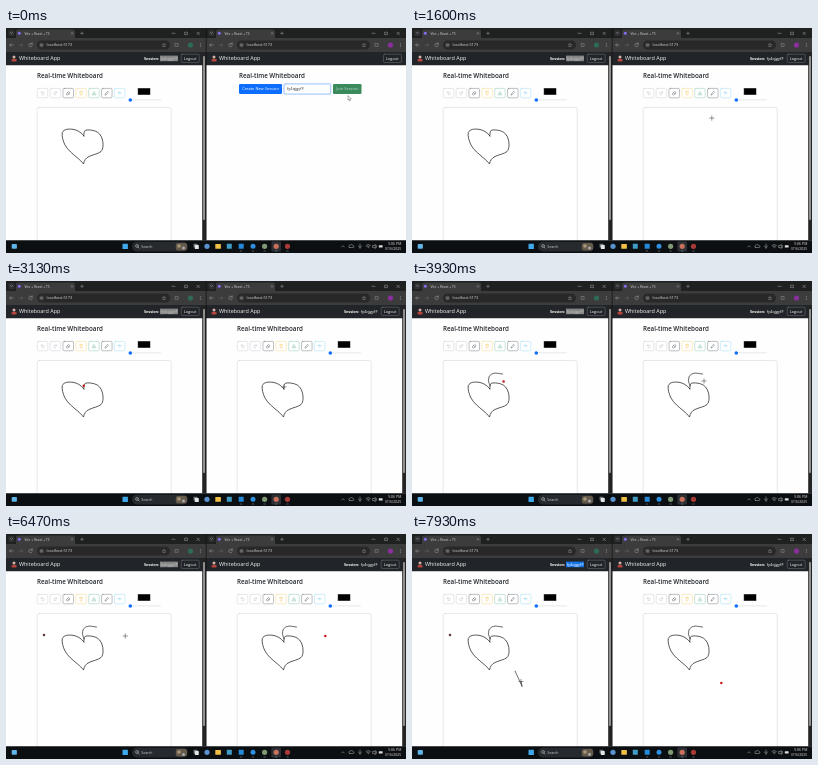
An HTML page with a canvas for the animation above (8 s loop, 400 by 225 pixels).

```html
<!DOCTYPE html>
<html lang="en">
<head>
<meta charset="utf-8">
<title>Shared whiteboard</title>
<style>
html, body { margin: 0; width: 100%; height: 100%; overflow: hidden; background: #0c0f12; }
canvas { display: block; width: 400px; height: 225px; }
</style>
</head>
<body>
<canvas id="stage"></canvas>
<script>
const LOOP = 8000, LAG = 60, SESSION = 'fy4qjgyfF';
const JOINED = 300, SYNCED = 2700, PEN_DOWN = 3200, PEN_UP = 3800, LEFT_RIGHT_PANE = 4400,
      FOCUS_LEFT = 7200, SECOND_STROKE = 7250;

// Mouse position: time, x, y
const mouseKeys = [
  [0, 342, 68], [300, 342, 69], [870, 342, 63], [1070, 342, 63], [1300, 379, 36], [1600, 300, 90],
  [1850, 251, 112], [1930, 264, 101], [2070, 267, 98], [2280, 267, 98], [2330, 271, 96],
  [2900, 277, 101], [3130, 278, 106], [3200, 278, 105], [3330, 276.4, 100], [3420, 277, 95.5],
  [3510, 280, 92.8], [3600, 283.5, 92], [3760, 290.5, 93], [3800, 290.5, 93], [3860, 291.5, 100.5],
  [3930, 292, 100], [4070, 296, 97], [4270, 296, 97], [4400, 238, 101], [4470, 198, 104],
  [4600, 196, 105], [4670, 175, 107], [5000, 138, 115], [5190, 129.3, 117], [5620, 129.3, 117],
  [5930, 119.3, 102], [6840, 119.3, 102], [7200, 103, 137], [7250, 103, 137], [7640, 110, 152],
  [7730, 110, 152.5], [7930, 109, 147.5], [8000, 109, 147]
];

const canvas = document.getElementById('stage'), c = canvas.getContext('2d');
const ratio = window.devicePixelRatio || 1;
canvas.width = 400 * ratio;
canvas.height = 225 * ratio;

function mouseAt(t) {
  const i = Math.max(1, mouseKeys.findIndex(k => k[0] >= t));
  const [t0, x0, y0] = mouseKeys[i - 1], [t1, x1, y1] = mouseKeys[i];
  const p = Math.max(0, (t - t0) / (t1 - t0));
  return [x0 + (x1 - x0) * p, y0 + (y1 - y0) * p];
}

function box(x, y, w, h, fill, radius = 0, stroke, line = 0.5) {
  c.beginPath();
  c.roundRect(x, y, w, h, radius);
  if (fill) { c.fillStyle = fill; c.fill(); }
  if (stroke) { c.strokeStyle = stroke; c.lineWidth = line; c.stroke(); }
}

function circle(x, y, r, fill) {
  c.beginPath();
  c.arc(x, y, r, 0, 7);
  c.fillStyle = fill;
  c.fill();
}

function path(d, color, width = 0.5) {
  c.strokeStyle = color;
  c.lineWidth = width;
  c.stroke(new Path2D(d));
}

function text(str, x, y, size, color, weight = 400, align = 'left') {
  c.font = `${weight} ${size}px "Open Sans", "Noto Sans", sans-serif`;
  c.textAlign = align;
  c.fillStyle = color;
  c.fillText(str, x, y);
}

function browserBar(avatar) {
  box(0, 0, 200, 11, '#1f2020');
  box(2.5, 2, 6, 6, '#303132', 1.5);
  path('M4.5 4.5l1 1 1-1', '#bbb');
  box(10, 1.5, 59, 12, '#3c3c3c', 2);
  box(0, 10, 200, 14, '#3c3c3c');
  circle(13.3, 5.3, 1.5, '#8a6cf0');
  text('Vite + React + TS', 18.5, 6.6, 3.3, '#d8d8d8');
  path('M65.200 4.500l1.700 1.700M66.900 4.500l-1.700 1.700M74.700 5.300h2.600M76 4v2.600', '#bbb', 0.4);
  path('M166 5.3h3M179 4.200h2.400v2.400h-2.400zM191 4.200l2.400 2.400M193.400 4.200l-2.400 2.400', '#ccc', 0.4);
  path('M7.300 17h-3.600M5 15.700l-1.300 1.300 1.300 1.300', '#bbb', 0.4);
  path('M13 17h3.600M15.300 15.700l1.300 1.300-1.300 1.300', '#777', 0.4);
  path('M26 15.8a1.8 1.8 0 1 0 .3 1.8M26.300 14.8v1.4h-1.4', '#bbb', 0.4);
  box(31, 12.5, 133, 9, '#282828', 4.5);
  circle(35.5, 17, 2.5, '#3c3c3c');
  path('M34.3 16.3h2.4M34.3 17.8h2.4', '#ccc', 0.4);
  text('localhost:5173', 40.5, 18.4, 3.8, '#dcdcdc');
  path('M158 15.5l.6 1.2 1.2.1-.9.9.3 1.2-1.2-.6-1.2.6.3-1.2-.9-.9 1.2-.1z', '#aaa', 0.35);
  path('M169.500 15.500h2.600v2.800h-2.600z', '#aaa', 0.4);
  circle(184.5, 17, 2.6, avatar);
  [15.6, 17, 18.4].forEach(y => circle(194.3, y, 0.4, '#ccc'));
}

function navbar(shift, selection) {
  box(0, 24, 200, 13.3, '#212529');
  box(5.5, 31, 5.2, 2.4, '#b8443c', 1);
  circle(8, 28.9, 1.5, '#d8b0a4');
  text('Whiteboard App', 13, 32.2, 5.45, '#f4f4f4');
  if (!shift) {
    text('Session:', 138, 31.6, 3.8, '#fff', 700);
    if (selection) box(154, 27.6, 18, 5.6, selection);
    text(SESSION, 154.7, 31.6, 4, selection === '#858585' ? '#c4c4c4' : '#fff');
  }
  box(175.2 + shift, 26.2, 18, 8.3, null, 1.2, '#a4a7aa', 0.3);
  text('Logout', 184 + shift, 31.7, 3.9, '#f4f4f4', 400, 'center');
}

function tools() {
  const dark = '#5b6066', grey = '#bfc3c7';
  const buttons = [
    [grey, 'M-1.3-.8h1.8a1.2 1.2 0 0 1 0 2.4h-1M-.4-1.8l-1 1 1 1'],
    [grey, 'M1.3-.8h-1.8a1.2 1.2 0 0 0 0 2.4h1M.4-1.8l1 1-1 1'],
    [dark, 'M-1.8.6l2.2-2.3 1.5 1.4-2.2 2.1h-.7zM-.7-.6l1.5 1.4'],
    ['#f7cf70', 'M-1.5-1.3h3M-1.1-1.3l.2 3.2h1.8l.2-3.2M-.5-1.9h1'],
    ['#7dbfa0', 'M0-1.9v2.6M-1-.3l1 1 1-1M-1.7.8v1h3.4v-1'],
    [dark, 'M-1.7 1.7l.5-1.4 2-2 .9.9-2 2z'],
    ['#86d3f2', 'M-1.5-.6h3M-.6-1.5l-.9.9M.8.6h-1.6']
  ];
  buttons.forEach(([color, icon], i) => {
    const x = 31.3 + i * 12.85;
    box(x, 60.4, 10.5, 9.4, '#fff', 1.3, color, 0.4);
    c.save();
    c.translate(x + 5.25, 65.1);
    path(icon, color, 0.5);
    c.restore();
  });
  box(131.6, 59.9, 12.9, 7.2, '#8a8a8a', 0.3);
  box(132.1, 60.4, 11.9, 6.2, '#000');
  box(123, 71.6, 32, 0.7, '#dcdfe3', 0.3);
  circle(124.3, 72, 1.8, '#0d6efd');
}

function heart() {
  path('M78 108C75 104 71 102 67 101.300C62 100.800 58 101 56.300 104.500C55.600 108 57 113 59 117' +
       'C62 122.500 67 126 71 129.500C74 132 76 134 77.500 136C78.300 132 80 130 83 128.500' +
       'C87 126.500 92 126 95 123.500C97.500 121 97.300 116 96.500 112C95.300 107 92.500 104 88.500 102.800' +
       'C84.500 101.800 81.500 101.600 79.300 102.300C78.200 103 77.800 105.500 77.800 108', '#222', 0.75);
}

function stroke(from, to, dx) {
  c.beginPath();
  for (let t = from; t < to + 15; t += 15) {
    const [x, y] = mouseAt(Math.min(t, to));
    c.lineTo(x + dx, y);
  }
  c.strokeStyle = '#222';
  c.lineWidth = 0.75;
  c.stroke();
}

function board(scrollHover) {
  text('Real-time Whiteboard', 31, 50.1, 6.25, '#212529', 600);
  tools();
  box(31.2, 79.5, 134, 150, '#fff', 2, '#c9ccd0', 0.45);
  box(196.2, 24, 3.8, 188.5, '#242424');
  box(197, 28, 2, 164, scrollHover ? '#c8c8c8' : '#8f8f8f', 0.8);
}

function joinForm() {
  text('Real-time Whiteboard', 33, 50.1, 6.25, '#212529', 600);
  box(33, 56, 43, 10, '#0d6efd', 1.3);
  text('Create New Session', 54.5, 62.4, 4, '#fff', 400, 'center');
  box(77.8, 55.8, 47, 10.4, '#fff', 1.3, '#bcd6fb', 1.1);
  box(78.2, 56.2, 46.2, 9.6, null, 1.2, '#86b7fe', 0.4);
  text(SESSION, 81, 62.4, 4, '#333');
  box(127, 56, 28.5, 10, '#3a8a5c', 1.3);
  text('Join Session', 141.3, 62.4, 4, '#b9d8c6', 400, 'center');
}

function taskbar(t) {
  box(0, 212.3, 400, 13, '#0c0f12');
  box(5.7, 216, 5.2, 4.8, '#5fb4e8', 0.8);
  box(116.5, 215.7, 5.4, 5.4, '#3fa8e8', 0.4);
  box(126, 213.8, 56, 9.6, '#262a2e', 4.8);
  c.beginPath();
  c.arc(131, 218, 1.4, 0, 7);
  c.strokeStyle = '#ddd';
  c.lineWidth = 0.5;
  c.stroke();
  path('M132 219l1.200 1.200', '#ddd');
  text('Search', 135.3, 219.6, 3.5, '#d0d3d6');
  box(169.8, 215, 11.2, 7.4, '#65594a', 2);
  circle(173, 218, 1.8, '#a8977c');
  circle(177.5, 220 + Math.sin(t / 250) * 0.6, 1.5, '#a8abb0');
  box(187.6, 215.8, 3.8, 3.8, '#6f7478', 0.4);
  box(188.8, 217, 4, 4, '#e2e4e6', 0.4);
  circle(201, 218.3, 2.6, '#5a92d0');
  box(209.3, 216, 5.6, 4.8, '#f0bf45', 0.6);
  box(220.8, 215.8, 5, 5, '#3f9cc4', 0.5);
  box(232.7, 215.8, 5, 5, '#2489d8', 0.5);
  circle(247, 218.3, 2.5, '#2f8fe0');
  circle(258.6, 218.3, 2.6, '#7f9a72');
  box(265.4, 213.4, 9.6, 10, '#2c3034', 1);
  circle(270.2, 218.3, 2.6, '#c8705c');
  circle(281.5, 218.3, 2.6, '#a83a36');
  [235, 247, 258.6, 270.2, 281.5].forEach(x => box(x - 1.2, 222.7, 2.4, 0.6, '#8fa0ae', 0.3));
  path('M335.700 219l1.300-1.300 1.300 1.300', '#ddd', 0.4);
  path('M343.500 219.500h3.500a.9.9 0 0 0 0-1.800a1.600 1.600 0 0 0-2.900-.5a1.200 1.200 0 0 0-.6 2.300', '#ddd', 0.4);
  path('M354 215.900v2.300M352.600 218a1.400 1.400 0 0 0 2.800 0M354 219.500v1', '#ddd', 0.4);
  path('M360 217.400q2.200-2 4.400 0M360.900 218.600q1.300-1.200 2.600 0', '#eee', 0.4);
  circle(362.2, 219.7, 0.45, '#eee');
  path('M367 217.500h1l1.300-1v4l-1.300-1h-1zM370.300 217.300q.8 1.200 0 2.400', '#eee', 0.4);
  box(372.8, 217.2, 3.8, 2.2, '#ddd', 0.5);
  text('5:06 PM', 395.3, 217.300, 3.5, '#e8e8e8', 400, 'right');
  text('3/16/2025', 395.3, 222.3, 3.5, '#e8e8e8', 400, 'right');
}

function pane(x, avatar, draw) {
  c.save();
  c.beginPath();
  c.rect(x, 0, 200, 225);
  c.clip();
  c.translate(x, 0);
  box(0, 0, 200, 213, '#fefeff');
  browserBar(avatar);
  draw();
  c.restore();
}

const onBoard = (x, y) => y > 80 && ((x > 31 && x < 165) || (x > 231 && x < 365));

function cursor(x, y) {
  if (onBoard(x, y)) {
    path(`M${x - 2.2} ${y}h4.400M${x} ${y - 2.2}v4.400`, '#444', 0.55);
    return;
  }
  const arrow = new Path2D(`M${x} ${y}v4.200l1-.9.700 1.500.7-.3-.7-1.500h1.300z`);
  c.fillStyle = '#fff';
  c.fill(arrow);
  c.strokeStyle = '#222';
  c.lineWidth = 0.35;
  c.stroke(arrow);
}

function render(t) {
  c.setTransform(ratio, 0, 0, ratio, 0, 0);
  c.lineJoin = c.lineCap = 'round';
  const [mx, my] = mouseAt(t);
  const joined = t >= JOINED;

  pane(0, '#2e6a58', () => {
    navbar(0, t < FOCUS_LEFT ? '#858585' : '#1473e6');
    board(mx > 195.5 && mx < 200);
    heart();
    if (t >= PEN_UP) stroke(PEN_DOWN, PEN_UP, -200);
    if (t >= SECOND_STROKE) stroke(SECOND_STROKE, t, 0);
    const [x, y] = mouseAt(Math.min(t - LAG, LEFT_RIGHT_PANE));
    if (t > 1300 && onBoard(x, y)) circle(x - 200, y, 1.25, t < FOCUS_LEFT - 1800 ? '#c81c1c' : '#5e3434');
  });

  pane(200, '#8a2f9c', () => {
    navbar(joined ? 0 : 2.3);
    if (!joined) return joinForm();
    board(false);
    if (t >= SYNCED) heart();
    if (t >= PEN_DOWN) stroke(PEN_DOWN, Math.min(t, PEN_UP), -200);
    const [x, y] = mouseAt(t - LAG);
    if (t > 4600 && onBoard(x, y)) circle(x, y, 1.25, '#d0141c');
  });

  box(199.8, 0, 0.7, 212.5, '#111');
  taskbar(t);
  cursor(mx, my);
}

function tick() {
  render(performance.now() % LOOP);
  requestAnimationFrame(tick);
}
tick();
</script>
</body>
</html>
```
